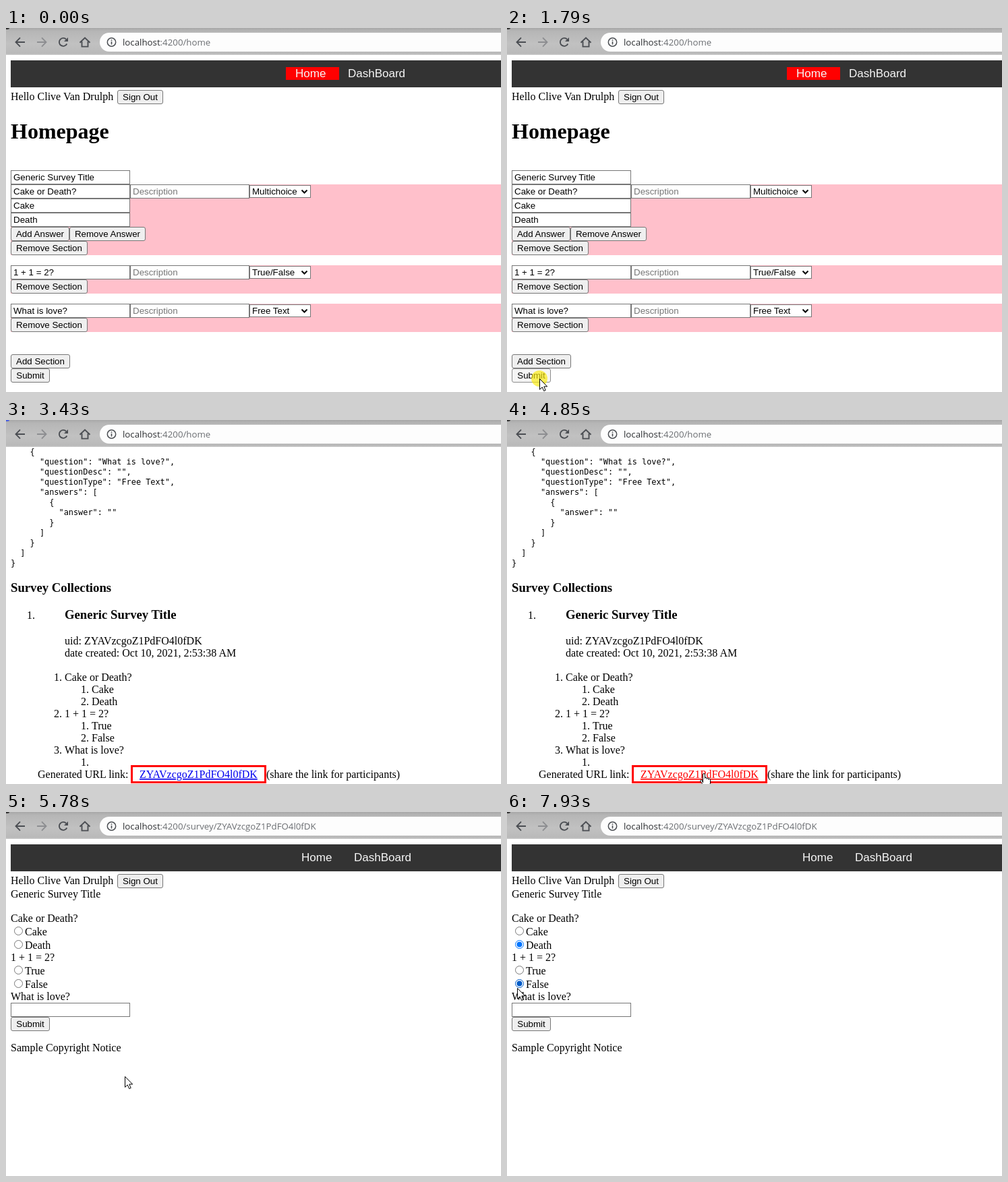
Animation, 734 px wide and 540 px high, one loop 8 s. Source, as an HTML page:

```html
<!DOCTYPE html>
<html lang="en">
<head>
<meta charset="utf-8">
<title>Survey builder</title>
<style>
  html, body { margin: 0; width: 100%; height: 100%; overflow: hidden; background: #fff; }
  svg { display: block; width: 734px; height: 540px; }

  text { font: 16px "Liberation Serif", "Times New Roman", serif; fill: #000; }
  text.h1 { font-size: 32px; font-weight: bold; }
  text.h3 { font-size: 18.72px; font-weight: bold; }
  text.ui { font: 13.333px "Liberation Sans", Arial, sans-serif; }
  text.hint { fill: #757575; }
  text.nav { font: 17px "Liberation Sans", Arial, sans-serif; fill: #f6f6f6; }
  text.mono { font: 11.88px "DejaVu Sans Mono", monospace; }
  text.url { font: 13.27px "Open Sans", "Noto Sans", sans-serif; fill: #6b6e72; }
  .url .host { fill: #2c2e31; }
  text.link { fill: #00e; text-decoration: underline; }

  .field { fill: #fff; stroke: #767676; }
  .btn { fill: #efefef; stroke: #767676; }
  .icon { fill: none; stroke: #4b4e53; stroke-width: 1.9; }
  .radio { color: #767676; fill: #fff; }
  .radio .ring { fill: #fff; stroke: currentColor; }

  /* 8 s loop: 1% is 80 ms */
  .home, .json, .survey, .loaded, .notice, .submit, .link, .corner, .death, .false,
  .cursor, .seen, .arrow, .hand, .click { animation: 8s step-end infinite; }
  .home { animation-name: home; }
  .json { animation-name: json; }
  .survey { animation-name: survey; }
  .loaded { animation-name: loaded; }
  .notice { animation-name: notice; }
  .submit { animation-name: submit; }
  text.link { animation-name: link; }
  .corner { animation-name: corner; }
  .death { animation-name: death; }
  .false { animation-name: false-pick; }
  .cursor { animation-name: move; }
  .seen { animation-name: seen; }
  .arrow { animation-name: arrow; }
  .hand { animation-name: hand; }
  .click { animation-name: click; }

  @keyframes home { 0% { opacity: 1 } 42.875% { opacity: 0 } 100% { opacity: 0 } }
  @keyframes json { 0% { opacity: 0 } 42.875% { opacity: 1 } 61.375% { opacity: 0 } 100% { opacity: 0 } }
  @keyframes survey { 0% { opacity: 0 } 61.375% { opacity: 1 } 100% { opacity: 1 } }
  @keyframes loaded { 0% { opacity: 0 } 68% { opacity: 1 } 100% { opacity: 1 } }
  @keyframes notice {
    0% { transform: translateY(-212px) }
    68% { transform: none }
    100% { transform: none }
  }
  @keyframes submit {
    0% { fill: #efefef; stroke: #767676 }
    9.25% { fill: #e5e5e5; stroke: #4f4f4f }
    22.375% { fill: #f5f5f5; stroke: #8d8d8d }
    23.25% { fill: #e5e5e5; stroke: #4f4f4f }
    24.375% { fill: #efefef; stroke: #767676 }
    100% { fill: #efefef; stroke: #767676 }
  }
  @keyframes link { 0% { fill: #00e } 60.125% { fill: #f00 } 100% { fill: #f00 } }
  @keyframes corner { 0% { fill: #333 } 42.875% { fill: #4a5fe0 } 60.125% { fill: #333 } 100% { fill: #333 } }
  @keyframes death {
    0% { color: #767676; fill: #fff }
    82.625% { color: #4f4f4f; fill: #fff }
    84.375% { color: #005cc8; fill: #005cc8 }
    85.25% { color: #0075ff; fill: #0075ff }
    100% { color: #0075ff; fill: #0075ff }
  }
  @keyframes false-pick {
    0% { color: #767676; fill: #fff }
    90.5% { color: #4f4f4f; fill: #fff }
    96.375% { color: #005cc8; fill: #005cc8 }
    100% { color: #005cc8; fill: #005cc8 }
  }

  @keyframes move {
    0% { transform: translate(510px, 532px) }
    1.75% { transform: translate(510px, 532px); animation-timing-function: steps(4, start) }
    5.083% { transform: translate(190px, 524px); animation-timing-function: steps(6, start) }
    10.083% { transform: translate(48px, 520px) }
    23.25% { transform: translate(48px, 520px); animation-timing-function: steps(4, start) }
    27.75% { transform: translate(114px, 520px) }
    32.625% { transform: translate(129px, 530px) }
    46.125% { transform: translate(472px, 541px); animation-timing-function: steps(6, start) }
    51.75% { transform: translate(269px, 530px); animation-timing-function: steps(5, start) }
    56.437% { transform: translate(299px, 526px) }
    57.125% { transform: translate(299px, 526px); animation-timing-function: steps(2, start) }
    58.875% { transform: translate(291px, 524px) }
    69.75% { transform: translate(291px, 524px); animation-timing-function: steps(4, start) }
    73.083% { transform: translate(176px, 392px); animation-timing-function: steps(4, start) }
    76.61% { transform: translate(70px, 210px); animation-timing-function: steps(4, start) }
    80% { transform: translate(11px, 113px); animation-timing-function: steps(4, start) }
    83.5% { transform: translate(14px, 198px) }
    85.25% { transform: translate(14px, 198px); animation-timing-function: steps(6, start) }
    90.5% { transform: translate(13px, 247px); animation-timing-function: steps(3, start) }
    93.125% { transform: translate(13px, 257px) }
    99.125% { transform: translate(15px, 261px) }
    100% { transform: translate(15px, 261px) }
  }
  @keyframes seen {
    0% { opacity: 0 } 1.75% { opacity: 1 }
    33.5% { opacity: 0 } 46.125% { opacity: 1 } 100% { opacity: 1 }
  }
  @keyframes arrow { 0% { opacity: 1 } 48% { opacity: 0 } 61.375% { opacity: 1 } 100% { opacity: 1 } }
  @keyframes hand { 0% { opacity: 0 } 48% { opacity: 1 } 61.375% { opacity: 0 } 100% { opacity: 0 } }
  @keyframes click {
    0% { opacity: 0 }
    22.375% { opacity: .68 } 23.25% { opacity: 0 }
    60.125% { opacity: .68 } 60.625% { opacity: 0 }
    83.5% { opacity: .68 } 84.375% { opacity: 0 }
    95.625% { opacity: .68 } 96.375% { opacity: 0 }
    100% { opacity: 0 }
  }
</style>
</head>
<body>
<svg id="stage" viewBox="0 0 734 540"></svg>
<script>
  const UID = 'ZYAVzcgoZ1PdFO4l0fDK';
  const USER = 'Clive Van Drulph';

  const text = (x, y, str, cls = '') => `<text x="${x}" y="${y}" class="${cls}">${str}</text>`;
  const rect = (x, y, w, h, fill) => `<rect x="${x}" y="${y}" width="${w}" height="${h}" fill="${fill}"/>`;
  const box = (x, y, w, h, cls, r = 0) =>
    `<rect x="${x + .5}" y="${y + .5}" width="${w - 1}" height="${h - 1}" rx="${r}" class="${cls}"/>`;
  const group = (cls, ...parts) => `<g class="${cls}">${parts.join('')}</g>`;

  const button = (x, y, w, label, cls = '') =>
    box(x, y, w, 21, 'btn ' + cls, 2.5) +
    `<text x="${x + w / 2}" y="${y + 15}" class="ui" text-anchor="middle">${label}</text>`;
  const field = (x, y, value, cls = '') => box(x, y, 177, 21, 'field') + text(x + 4, y + 15, value, 'ui ' + cls);
  const select = (x, y, value) =>
    box(x, y, 91, 19, 'field') + text(x + 4, y + 14, value, 'ui') +
    `<path d="M${x + 77.5} ${y + 7.5}l4 4 4-4" fill="none" stroke="#000" stroke-width="2"/>`;
  const radio = (y, label, cls = '') =>
    `<g class="radio ${cls}"><circle class="ring" cx="18.5" cy="${y - 6.5}" r="6"/>` +
    `<circle cx="18.5" cy="${y - 6.5}" r="4"/></g>` + text(28, y, label);

  const question = (y, title, type) =>
    field(7, y, title) + field(184, y, 'Description', 'hint') + select(361, y + 1, type);
  const section = (y, h, ...parts) =>
    rect(7, y, 727, h, '#ffc0cb') + parts.join('') + button(7, y + h - 21, 114, 'Remove Section');

  const header = (home, dash) =>
    rect(7, 48, 727, 40, '#333') + text(home, 73, 'Home', 'nav') + text(dash, 73, 'DashBoard', 'nav') +
    text(7, 107, 'Hello ' + USER) + button(165, 92, 68, 'Sign Out');
  const address = path =>
    `<text x="173" y="26" class="url"><tspan class="host">localhost</tspan>:4200/${path}</text>`;

  const toolbar = group('bar',
    `<defs><linearGradient id="metal" x2="0" y2="1">
      <stop offset="0" stop-color="#a8a8a8"/><stop offset=".12" stop-color="#b6b6b6"/>
      <stop offset=".6" stop-color="#c1c1c1"/><stop offset=".95" stop-color="#b9b9b9"/>
      <stop offset="1" stop-color="#d0d0d0"/></linearGradient></defs>`,
    rect(0, 0, 734, 40, 'url(#metal)'),
    '<rect x="139" y="7" width="640" height="28" rx="14" fill="#fdfdfd"/>',
    '<ellipse class="corner" cx="1" cy="0" rx="4" ry="2"/>',
    '<path class="icon" d="M28 21H15.5M21 14.3L14.5 21l6.5 6.7"/>',
    '<path class="icon" d="M46 21h12.500M53 14.3l6.500 6.700-6.500 6.700" style="stroke:#8d8e91"/>',
    '<path class="icon" d="M90.300 23.500A6 6 0 1 1 89.300 16.800"/>',
    '<path d="M92 14v6h-6z" fill="#4b4e53"/>',
    '<path class="icon" d="M109.500 21.800L117 14.600l7.500 7.200M112.500 20v7.600h9V20"/>',
    '<circle class="icon" cx="156.500" cy="21" r="6.200" style="stroke-width:1.500"/>',
    rect(155.700, 20, 1.600, 4.500, '#4b4e53'), rect(155.700, 17.300, 1.600, 1.600, '#4b4e53'));

  const home = group('home',
    address('home'),
    header(429, 507),
    rect(415, 58, 79, 19, '#f00'), text(429, 73, 'Home', 'nav'),
    text(7, 164, 'Homepage', 'h1'),
    section(232, 105,
      question(232, 'Cake or Death?', 'Multichoice'),
      field(7, 253, 'Cake'), field(7, 274, 'Death'),
      button(7, 295, 87, 'Add Answer'), button(94, 295, 113, 'Remove Answer')),
    field(7, 211, 'Generic Survey Title'),
    section(352, 42, question(352, '1 + 1 = 2?', 'True/False')),
    section(409, 42, question(409, 'What is love?', 'Free Text')),
    button(7, 484, 88, 'Add Section'),
    button(7, 505, 58, 'Submit', 'submit'));

  const dump = [
    [4, '{'], [6, '"question": "What is love?",'], [6, '"questionDesc": "",'],
    [6, '"questionType": "Free Text",'], [6, '"answers": ['], [8, '{'], [10, '"answer": ""'],
    [8, '}'], [6, ']'], [4, '}'], [2, ']'], [0, '}']
  ].map(([indent, str], i) => text(7 + indent * 7.15, 51 + i * 15, str, 'mono')).join('');

  const outline = [
    [71, '1.', 'Cake or Death?'], [111, '1.', 'Cake'], [111, '2.', 'Death'],
    [71, '2.', '1 + 1 = 2?'], [111, '1.', 'True'], [111, '2.', 'False'],
    [71, '3.', 'What is love?'], [111, '1.', '']
  ].map(([x, mark, str], i) => text(x, 387 + i * 18, mark) + text(x + 16, 387 + i * 18, str)).join('');

  const json = group('json',
    address('home'),
    dump,
    text(7, 255, 'Survey Collections', 'h3'),
    text(31, 295, '1.'), text(87, 295, 'Generic Survey Title', 'h3'),
    text(87, 333, 'uid: ' + UID),
    text(87, 351, 'date created: Oct 10, 2021, 2:53:38 AM'),
    outline,
    text(47, 531, 'Generated URL link:'),
    '<rect x="186.500" y="513.500" width="198" height="24" fill="none" stroke="#f00" stroke-width="3"/>',
    text(198, 531, UID, 'link'),
    text(386, 531, '(share the link for participants)'));

  const survey = group('survey',
    address('survey/' + UID),
    header(438, 516),
    group('loaded',
      text(7, 127, 'Generic Survey Title'),
      text(7, 163, 'Cake or Death?'),
      radio(183, 'Cake'), radio(203, 'Death', 'death'),
      text(7, 221, '1 + 1 = 2?'),
      radio(241, 'True'), radio(261, 'False', 'false'),
      text(7, 279, 'What is love?'),
      field(7, 283, ''),
      button(7, 304, 58, 'Submit')),
    text(7, 355, 'Sample Copyright Notice', 'notice'));

  const cursor = group('cursor', group('seen',
    '<circle class="click" r="12" fill="#fbea10"/>',
    `<path class="arrow" d="M.5 .5V16.300L4.200 12.800 6.700 18.500 9.200 17.400 6.800 11.900H11.700Z"
      fill="#fff" stroke="#000"/>`,
    `<path class="hand" transform="translate(-6 0)" fill="#fff" stroke="#000"
      d="M5.500 14V2a1.500 1.500 0 0 1 3 0v5.500a1.300 1.300 0 0 1 2.700 0v1a1.300 1.300 0 0 1 2.700 0v1
      a1.300 1.300 0 0 1 2.600 0V15l-2 3.500v3h-8v-3l-4.600-6.500a1.500 1.500 0 0 1 2.400-1.700z"/>`));

  document.getElementById('stage').innerHTML = toolbar + home + json + survey + cursor;
</script>
</body>
</html>
```
